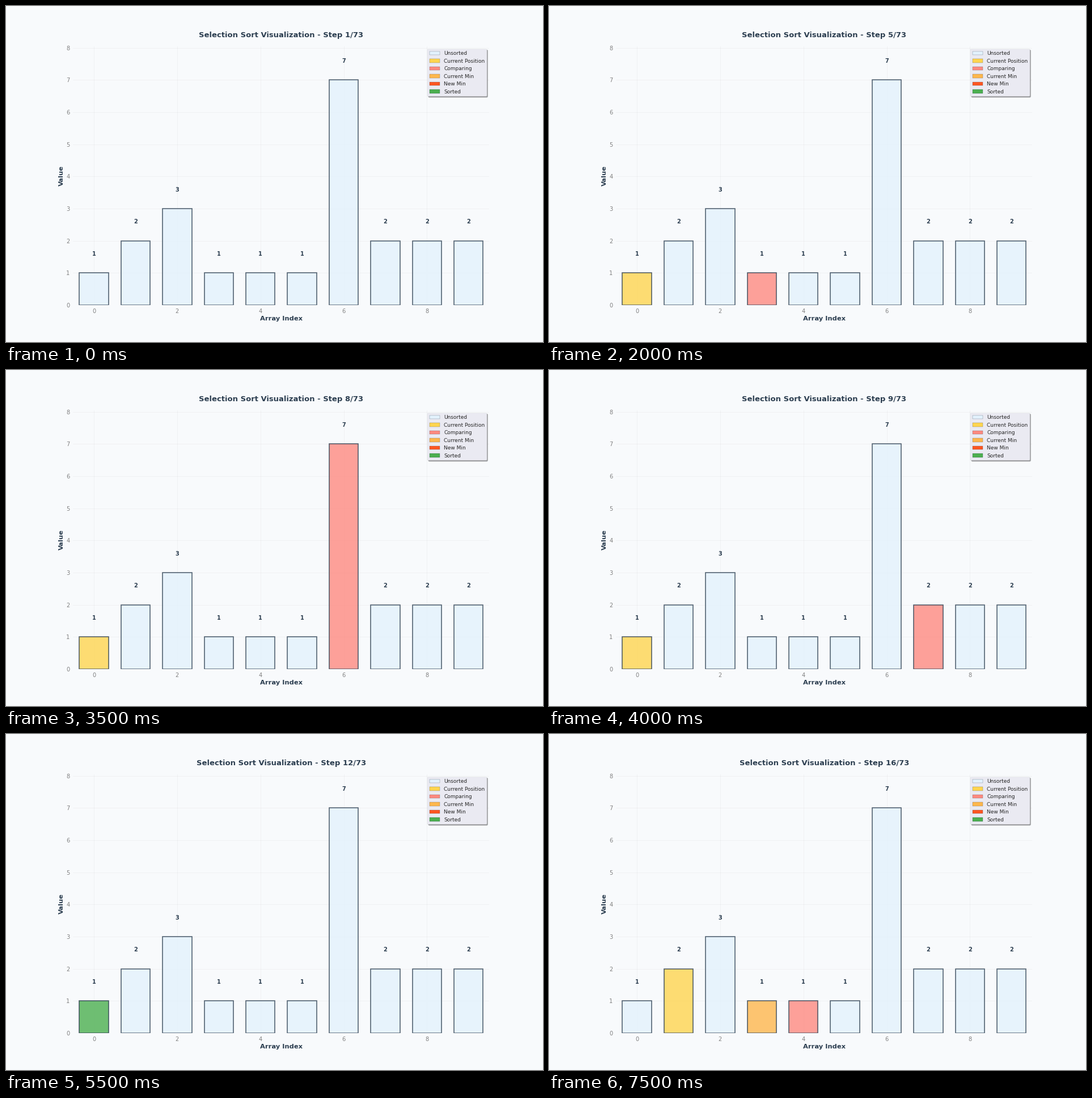
A matplotlib script for the animation above (8000 ms loop, 947 by 592 pixels).

```python
from itertools import islice

import matplotlib.pyplot as plt
from matplotlib.animation import FuncAnimation
from matplotlib.patches import Patch

VALUES = [1, 2, 3, 1, 1, 1, 7, 2, 2, 2]
TOTAL_STEPS = 73
SHOWN_STEPS = 16
STEP_MS = 500

BACKGROUND = "#F8FAFC"
INK = "#2C3E50"
COLORS = {
    "Unsorted": "#E3F2FD",
    "Current Position": "#FFD54F",
    "Comparing": "#FF8A80",
    "Current Min": "#FFB74D",
    "New Min": "#FF5722",
    "Sorted": "#4CAF50",
}

plt.rcParams.update({
    "font.family": "DejaVu Sans",
    "text.color": "0.15",
    "axes.facecolor": "#EAEAF2",
    "axes.linewidth": 0,
    "axes.axisbelow": True,
    "patch.linewidth": 0.3,
    "xtick.major.size": 0,
    "ytick.major.size": 0,
    "xtick.major.pad": 7,
    "ytick.major.pad": 7,
})


def selection_sort(values):
    """Yield (values, {index: state}) for every step of the sort."""
    a = list(values)
    yield a[:], {}
    for i in range(len(a) - 1):
        low = i
        yield a[:], {i: "Current Position"}
        for j in range(i + 1, len(a)):
            marks = {low: "Current Min", i: "Current Position"}
            if a[j] < a[low]:
                low = j
                marks = {i: "Current Position", j: "New Min"}
            else:
                marks[j] = "Comparing"
            yield a[:], marks
        a[i], a[low] = a[low], a[i]
        yield a[:], {i: "Sorted"}


steps = list(islice(selection_sort(VALUES), SHOWN_STEPS))

fig, ax = plt.subplots(figsize=(16, 10), dpi=59.2, facecolor=BACKGROUND)
ax.set_facecolor(BACKGROUND)
ax.set_xlim(-0.5, len(VALUES) - 0.5)
ax.set_ylim(0, max(VALUES) * 1.15)
ax.set_xticks(range(0, len(VALUES), 2))
ax.tick_params(labelsize=12, labelcolor="gray")
ax.grid(True, color="gray", alpha=0.1, linewidth=0.8)
ax.set_xlabel("Array Index", fontsize=14, fontweight="bold", color=INK)
ax.set_ylabel("Value", fontsize=14, fontweight="bold", color=INK)
title = ax.set_title("", fontsize=16, fontweight="bold", color=INK, pad=20)

bars = ax.bar(range(len(VALUES)), VALUES, width=0.7, alpha=0.8,
              edgecolor=INK, linewidth=2)
labels = [ax.text(i, v + 0.5, str(v), ha="center", va="bottom",
                  fontsize=12, fontweight="bold", color=INK)
          for i, v in enumerate(VALUES)]

ax.legend(handles=[Patch(facecolor=c, edgecolor=INK, label=name)
                   for name, c in COLORS.items()],
          loc="upper right", fontsize=11, frameon=True, shadow=True,
          facecolor="#EAEAF2")


def update(n):
    values, marks = steps[n]
    title.set_text(f"Selection Sort Visualization - Step {n + 1}/{TOTAL_STEPS}")
    for i, (bar, label, v) in enumerate(zip(bars, labels, values)):
        bar.set_height(v)
        bar.set_facecolor(COLORS[marks.get(i, "Unsorted")])
        label.set_text(str(v))
        label.set_y(v + 0.5)
    return [title, *bars, *labels]


anim = FuncAnimation(fig, update, frames=SHOWN_STEPS, interval=STEP_MS,
                     repeat=True, repeat_delay=0, blit=False)
plt.show()
```
